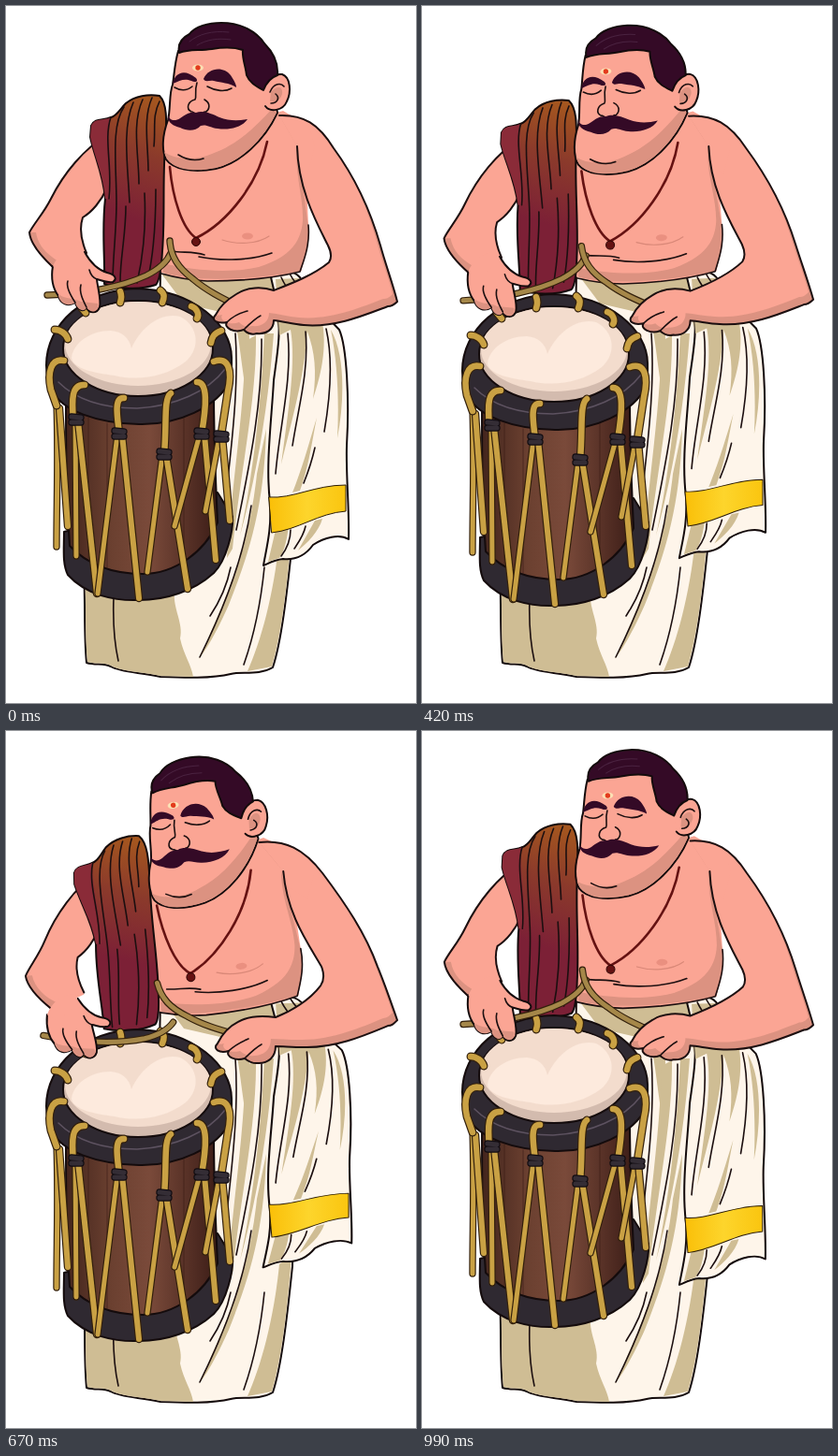
Recreate the animation shown at these times as an HTML page. Size 438 by 745 pixels, loop 1.02 s.

```html
<!DOCTYPE html>
<html lang="en">
<head>
<meta charset="utf-8">
<title>Drummer</title>
<style>
html, body { margin: 0; width: 100%; height: 100%; overflow: hidden; background: #fff; }
svg { display: block; width: 100vw; height: 100vh; }
path, ellipse { stroke-linecap: round; stroke-linejoin: round; }
.o { stroke: #140b0c; stroke-width: 2; }
.l { fill: none; stroke: #1c0f10; stroke-width: 1.6; }
.skin { fill: #fba594; }
.shade { fill: #dc9281; }
.tan { fill: #cfbd94; }
.cream { fill: #fef5ea; }
.hair { fill: #340a26; }
.dark { fill: #2f2931; }
</style>
</head>
<body>
<svg viewBox="0 0 438 745">
<defs>
  <linearGradient id="wood">
    <stop offset="0" stop-color="#43251d"/><stop offset=".3" stop-color="#6b4030"/>
    <stop offset=".55" stop-color="#7a4a3a"/><stop offset="1" stop-color="#3c1d17"/>
  </linearGradient>
  <linearGradient id="cloth" gradientUnits="userSpaceOnUse" x1="160" y1="100" x2="116" y2="220">
    <stop offset="0" stop-color="#a4561f"/><stop offset=".45" stop-color="#8b3a2b"/>
    <stop offset="1" stop-color="#7c2036"/>
  </linearGradient>
  <linearGradient id="gold">
    <stop offset="0" stop-color="#fabf08"/><stop offset=".5" stop-color="#fdd52c"/>
    <stop offset="1" stop-color="#fac50f"/>
  </linearGradient>
  <clipPath id="armClip"><path class="arm"/></clipPath>
</defs>

<g id="skirt">
  <path class="cream o" d="M165 284H300C310 310 312 330 310 350L306 572C300 630 294 680 285 707C270 716 252 711 240 714C220 719 190 718 165 717C140 712 122 712 112 706C104 702 96 705 86 702C83 670 85 640 83 600L160 560Z"/>
  <path class="tan" d="M166 286H300L291 345C286 320 276 308 262 314C258 340 262 380 258 420C250 380 250 350 242 330L190 318Z"/>
  <path class="tan" d="M267 352C268 420 250 500 242 580L236 590C240 520 254 440 256 358Z"/>
  <path class="tan" d="M286 350C280 430 268 500 250 566C264 500 272 430 276 350Z"/>
  <path class="tan" d="M278 452C276 530 262 580 238 640C222 676 212 690 206 698C232 640 260 580 268 500Z"/>
  <path class="tan" d="M84 610L180 626C178 644 190 660 186 676C190 694 198 704 200 717L165 716C140 711 122 711 112 705C104 701 96 704 87 701C84 670 86 640 84 610Z"/>
  <path class="tan" d="M305 560C300 630 292 680 284 706L258 711C272 680 286 630 292 570Z"/>
  <path class="l" d="M115 632C114 660 116 682 120 700M245 350C250 420 236 500 234 540M273 356C274 430 258 500 246 560M262 534C254 590 230 650 207 696M276 600C272 640 266 670 254 704M240 600C236 620 226 640 218 652"/>
</g>

<g id="flap">
  <path class="cream o" d="M283 290C294 284 306 281 314 290C322 310 346 336 356 346C364 364 367 420 364 470C363 500 367 540 366 570C356 564 340 568 328 576C318 590 306 592 296 591C286 592 280 596 275 598C278 580 284 560 282 530C277 490 284 440 286 400C290 370 294 350 290 320Z"/>
  <path class="tan" d="M288 292L314 291L336 328C344 360 338 390 328 420C332 390 330 370 322 348C318 400 306 440 294 490C302 430 310 380 304 346L292 352Z"/>
  <path class="tan" d="M347 346C362 372 362 420 354 462C356 420 354 380 347 346ZM332 440C326 470 324 490 314 518L306 520C318 490 324 466 332 440ZM288 560L302 556C300 570 298 582 292 590L280 594ZM330 550L338 548C334 562 322 574 312 582Z"/>
  <path class="l" d="M294 290C300 304 312 316 318 326M303 286C308 296 316 304 322 310M301 350C306 400 292 450 288 500M320 348C324 390 312 430 306 470M342 345C350 380 346 420 340 455M330 472C326 490 322 500 318 510"/>
  <path fill="url(#gold)" stroke="#2b1c06" stroke-width="1" d="M281 525C306 527 330 512 363 512V540C334 542 312 560 284 563Z"/>
  <path class="l" d="M304 560C304 572 300 580 294 588M320 556C318 566 312 574 308 580"/>
</g>

<g class="lean">
  <path class="skin" d="M160 150L296 112L326 130C318 160 322 200 323 236C325 256 318 272 315 284C290 290 255 294 215 294C196 293 180 290 164 284Z"/>
  <path class="shade" d="M311 150C308 180 318 204 317 230C315 252 304 268 270 279C240 286 200 283 168 275V285C196 293 240 295 315 284C318 272 325 256 323 236Z"/>
  <path class="l" d="M323 234C325 256 318 272 314 284C290 290 255 294 215 294C196 293 180 290 166 286M176 262C190 264 200 262 212 266M206 268C230 273 262 272 284 264"/>
  <ellipse cx="258" cy="246" rx="6" ry="3.5" fill="#ea9080"/>
  <path class="l" d="M231 250C246 255 268 255 281 246" style="stroke:#d98878;stroke-width:1.2"/>
  <path fill="none" stroke="#651212" stroke-width="2.6" d="M175 172C178 205 188 238 203 248C236 232 270 190 279 145"/>
  <ellipse cx="203" cy="252" rx="4.5" ry="4.5" fill="#651212" stroke="#2c0505"/>
</g>

<g class="armL">
  <path class="skin" d="M86 266C80 250 78 238 82 226C92 220 102 208 107 196L108 138C84 152 62 178 48 206C40 222 30 232 25 242C26 254 36 266 50 280Z"/>
  <path class="shade" d="M25 242C26 254 36 266 50 280L58 274C44 266 34 256 32 242Z"/>
  <path class="l" style="stroke-width:2" d="M86 264C80 250 78 238 82 226C92 220 102 208 107 196M108 138C84 152 62 178 48 206C40 222 30 232 25 242C26 254 36 266 50 279"/>
</g>

<g class="lean">
  <path class="o" fill="url(#cloth)" d="M91 128C95 119 104 123 112 119C118 118 122 110 128 104C138 96 152 94 164 96C172 104 172 120 170 150C167 190 170 226 167 262C166 280 164 294 160 298C142 304 120 302 105 297C106 270 102 240 106 206C104 180 94 160 90 140Z"/>
  <path d="M91 128C95 119 104 123 112 119C107 140 114 170 112 206L106 206C104 180 94 160 90 140Z" fill="#8a2b38"/>
  <path class="l" d="M126 108C112 128 118 170 118 210C118 240 114 270 114 296M136 103C124 130 130 170 132 210M146 100C134 126 142 160 142 190M156 98C146 120 152 150 152 176M164 102C156 118 160 130 158 150M112 119C104 142 114 172 110 206M128 214C128 244 122 270 122 294M148 200C150 240 146 270 140 296M160 196C160 230 158 262 152 290"/>
</g>

<g class="lean"><g id="head">
  <path class="skin o" d="M184 48C180 62 180 72 178 84C174 94 176 110 173 122C167 138 166 154 171 164C178 174 198 179 224 174C250 168 276 144 290 114L280 60L250 40Z"/>
  <path class="shade" d="M284 110C266 130 246 149 220 158C202 166 180 164 169 156C174 176 200 178 224 173C250 167 275 143 289 114Z"/>
  <path class="skin o" d="M275 88C278 78 286 72 295 73C304 76 305 92 300 102C296 112 282 114 277 107"/>
  <path class="shade" d="M283 92C290 84 296 86 295 94C292 102 288 104 282 102Z"/>
  <path class="l" d="M282 92C286 82 294 82 297 86M288 94C293 98 290 104 283 104"/>
  <path class="hair o" d="M185 50C183 40 188 34 196 30C202 22 216 18 230 18C252 18 268 28 276 40C286 50 291 62 290 74C284 76 278 82 275 90C268 86 260 82 257 74C256 64 252 56 253 47C244 44 232 44 220 46C206 48 196 46 185 50Z"/>
  <path d="M196 38C206 30 220 26 238 28M204 42C214 36 226 34 240 36" fill="none" stroke="#4a2240"/>
  <ellipse cx="205" cy="66" rx="6" ry="3.5" fill="#fbe0b4"/>
  <ellipse cx="205" cy="66" rx="2.7" ry="2.7" fill="#e33a1c"/>
  <path class="hair" d="M178 83C180 72 190 66 203 77C206 81 202 82 198 80C190 77 186 80 178 83ZM211 78C216 66 232 64 240 74C244 80 246 84 246 87C238 82 230 82 222 80C217 79 213 82 211 78Z"/>
  <path class="l" d="M180 87C187 91 194 90 199 86M215 86C224 91 234 92 241 88M204 82C201 92 204 96 202 100C194 102 192 110 198 113M212 100C219 104 218 111 212 114M199 113C204 117 209 116 212 113"/>
  <path class="hair" d="M173 116C174 122 180 124 186 120C192 116 196 113 203 114C210 111 220 115 228 119C238 123 248 123 258 121C252 130 238 133 226 131C218 130 214 126 208 128C202 134 194 134 186 130C178 128 172 124 173 116Z"/>
  <path class="l" d="M184 159C192 164 202 166 211 163"/>
</g></g>

<g id="drum">
  <path class="dark o" d="M62 562C62 580 60 596 66 608C86 630 116 636 142 635C170 635 200 626 222 606C236 592 243 560 242 546L226 520Z"/>
  <path fill="url(#wood)" stroke="#140b0c" stroke-width="2" d="M64 415C64 470 64 520 68 577C88 598 116 607 146 607C180 607 212 584 226 552C224 510 222 460 222 410Z"/>
  <path d="M88 440V590M108 446V600M190 440V592" fill="none" stroke="#3a1c15" stroke-opacity=".6"/>
  <path class="dark o" d="M43 384C43 340 84 303 141 302C200 304 241 340 241 376V398C226 430 182 448 142 447C96 446 60 432 50 412C44 402 43 394 43 384Z"/>
  <path d="M56 402C78 424 108 430 140 430C180 428 216 412 234 388" fill="none" stroke="#5d5260" stroke-width="1.5"/>
  <ellipse class="o" cx="141" cy="366" rx="80" ry="51" fill="#d3bbae"/>
  <ellipse cx="141" cy="361" rx="78" ry="45" fill="#f3dccd"/>
  <path fill="#fdeadd" d="M70 376C72 360 90 347 112 347C124 348 132 355 134 366C144 344 164 327 186 332C206 342 208 366 192 380C170 397 140 401 116 395C94 392 72 388 70 376Z"/>
  <g id="ropes"></g>
</g>

<g class="armL"><g id="handL">
  <g id="stickL"></g>
  <path class="skin" style="stroke:#140b0c;stroke-width:2" d="M84 263C90 274 98 282 108 285C117 287 119 292 114 295C106 296 102 293 97 292C98 302 102 314 100 322C97 329 89 329 86 322C84 328 76 325 74 317C66 322 58 318 56 310C50 302 48 290 50 278"/>
  <path class="skin" d="M50 278C56 264 70 256 82 258L84 268L60 286Z"/>
  <path class="shade" d="M56 308C64 314 74 312 80 316L98 318C100 328 90 329 86 322C84 328 76 325 74 317C66 322 58 318 56 310Z"/>
  <path class="l" d="M86 322C82 314 78 306 80 298M74 317C68 308 64 300 66 294M97 292C92 290 90 286 89 282"/>
</g></g>

<g id="stickR"></g>
<path class="arm shade"/>
<g clip-path="url(#armClip)">
  <path class="arm skin" transform="translate(-5 -8)"/>
  <path class="skin" d="M260 100H316L330 150L322 180L290 160Z"/>
</g>
<path class="arm l" style="stroke-width:2"/>
<path id="fingers" class="l"/>
</svg>

<script>
const NS = 'http://www.w3.org/2000/svg';
const $ = id => document.getElementById(id);
const all = name => [...document.querySelectorAll('.' + name)];

function add(parent, d, color, width) {
  const p = document.createElementNS(NS, 'path');
  p.setAttribute('d', d);
  p.setAttribute('fill', 'none');
  p.setAttribute('stroke', color);
  p.setAttribute('stroke-width', width);
  parent.append(p);
}
function cord(parent, d, width, color = '#c9a144', edge = '#33200c') {
  add(parent, d, edge, width + 2.4);
  add(parent, d, color, width);
}

// Lacing: strands first, then loops over the rim, then knots
const ropes = $('ropes');
['M54 425C56 480 54 530 54 578', 'M57 430L66 556', 'M74 442L75 588', 'M77 444L97 628',
 'M119 458L98 628', 'M124 458L142 633', 'M167 480L151 605', 'M171 480L194 623',
 'M207 458L180 556', 'M212 458L224 592', 'M228 460L213 540', 'M231 460L239 550']
  .forEach((d, i) => cord(ropes, d, i % 2 ? 6 : 5));
['M62 379C48 376 44 392 48 410L54 427', 'M84 405C70 404 70 420 72 444',
 'M126 419C116 418 118 434 121 457', 'M176 414C168 420 172 446 169 478',
 'M204 402C216 402 214 428 209 457', 'M222 380C238 374 242 390 237 412L230 458',
 'M52 346C58 346 64 350 66 356', 'M80 322L85 328', 'M122 305C124 310 123 314 122 317',
 'M165 304C170 308 169 312 167 317', 'M198 321C204 323 207 330 204 334', 'M230 347C222 350 220 354 219 360']
  .forEach(d => cord(ropes, d, 6.5));
[[75, 442], [121, 457], [169, 479], [209, 457], [230, 460]].forEach(([x, y]) => {
  cord(ropes, `M${x - 5} ${y - 3}L${x + 5} ${y - 2}M${x - 5} ${y + 3}L${x + 5} ${y + 3}`, 5, '#342d35', '#120d12');
});

cord($('stickL'), 'M44 309C84 308 124 300 150 288C164 281 172 274 176 264', 5, '#a58749');
cord($('stickR'), 'M175 251C176 268 184 280 200 292C214 304 230 312 250 322', 5, '#a58749');

// Striking arm: raised, lowered, raised while leaning
const arm = [
  'M292 117C318 116 334 126 350 152C372 182 388 214 400 256C406 278 413 296 418 316C414 320 412 321 408 321C384 330 352 344 318 341C306 340 296 337 286 336C286 346 278 351 268 350C262 352 258 350 254 346C244 350 232 344 236 338C226 340 218 336 224 330C228 322 236 314 246 308C258 300 274 300 286 304C304 297 328 288 345 274C349 268 347 262 344 256C332 232 312 196 311 150',
  'M292 117C318 116 334 126 350 152C371 182 386 212 395 246C401 268 407 284 413 303C408 307 405 308 402 308C380 318 350 330 318 330C308 331 300 331 292 332C292 346 286 352 274 358C266 360 258 359 252 355C250 360 245 364 238 364C230 364 227 360 230 354C230 344 234 332 240 322C250 310 270 301 286 303C304 297 328 288 342 270C346 264 346 260 343 254C332 232 312 196 311 150',
  'M270 119C298 116 318 126 338 152C362 184 384 216 397 252C406 274 412 292 418 309C414 313 412 315 408 315C384 325 352 339 318 338C306 338 296 337 288 337C288 349 280 355 270 355C264 356 260 354 255 350C245 353 234 348 238 342C228 345 220 340 226 334C230 326 238 316 248 311C260 304 274 304 288 306C304 300 324 288 336 272C340 266 340 260 337 252C322 226 300 196 296 150'
];
const fingers = [
  'M258 326C250 328 242 332 236 338M272 331C266 334 260 340 254 346',
  'M258 330C254 338 250 346 252 355M274 336C274 344 270 350 266 355',
  'M259 329C252 332 244 336 238 342M273 335C267 338 261 344 255 350'
];
const numbers = d => d.match(/-?[\d.]+/g).map(Number);
function blender(poses) {
  const [up, down, bent] = poses.map(numbers);
  return (hit, lean) => {
    let i = 0;
    return poses[0].replace(/-?[\d.]+/g, () => {
      const v = up[i] + hit * (down[i] - up[i]) + lean * (bent[i] - up[i]);
      i++;
      return ' ' + v.toFixed(2);
    });
  };
}
const armAt = blender(arm), fingersAt = blender(fingers);

// [ms, value]; the right stick falls three times per loop
const LEAN = [[0, 0], [260, .75], [420, 1.95], [510, 3.7], [670, 6.1], [780, 6.7], [900, 6.3], [960, 3.2], [990, 1.5], [1020, 0]];
const DROP = [[0, 0], [260, 1], [420, 6], [510, 11], [670, 17], [780, 18], [900, 15], [990, 2], [1020, 0]];
const TWIST = [[0, 0], [740, 0], [900, .7], [990, 0], [1020, 0]];
const RIGHT = [[0, 0], [90, 0], [190, .9], [230, 1], [270, 1], [390, 0], [430, 0], [500, 1], [540, 1], [640, 0], [720, 0], [840, 1], [900, 1], [980, 0], [1020, 0]];
const LEFT = [[0, 0], [280, 0], [330, 1], [400, 0], [580, 0], [650, 1], [700, 1], [770, 0], [1020, 0]];
const TICKS = [0, 60, 130, 160, 230, 260, 290, 320, 390, 420, 450, 480, 510, 540,
  610, 640, 670, 740, 770, 840, 870, 900, 930, 960, 990];

function at(keys, t) {
  const i = keys.findIndex(k => k[0] > t);
  const [t0, a] = keys[i - 1], [t1, b] = keys[i];
  return a + (b - a) * (t - t0) / (t1 - t0);
}
const set = (el, value) => el.setAttribute('transform', value);

function draw(now) {
  const ms = now % 1020;
  const t = TICKS.filter(k => k <= ms).pop();
  const deg = at(LEAN, t), lean = deg / 6.2;
  const hit = at(RIGHT, t), tap = at(LEFT, t);

  all('lean').forEach(g => set(g, `rotate(${-deg} 305 310)`));
  all('armL').forEach(g => set(g, `rotate(${-deg * .66} 305 310)`));
  set($('head'), `rotate(${-2 * lean} 240 100)`);
  set($('flap'), `translate(285 285) scale(${1 + .04 * lean} ${1 - .08 * lean}) translate(-285 -285)`);
  set($('drum'), `translate(0 ${at(DROP, t)}) rotate(${at(TWIST, t)} 141 380)`);
  set($('handL'), `translate(${-5 * tap} ${7 * tap})`);
  set($('stickL'), `rotate(${17 * tap} 75 306)`);

  const turn = -11 * lean * (1 - hit) + hit * (8 * lean - 61);
  const dx = hit * (19 * lean - 5), dy = 5 * hit + 3 * lean * (1 - hit);
  set($('stickR'), `translate(${dx} ${dy}) rotate(${turn} 250 330)`);
  const d = armAt(hit, lean);
  all('arm').forEach(p => p.setAttribute('d', d));
  $('fingers').setAttribute('d', fingersAt(hit, lean));
}
function loop() {
  draw(performance.now() - start);
  requestAnimationFrame(loop);
}
const start = performance.now();
loop();
</script>
</body>
</html>
```
